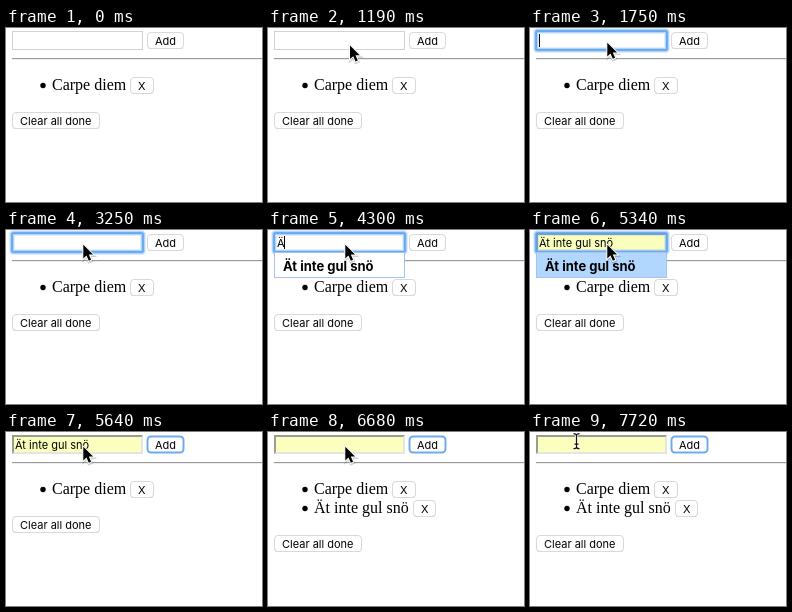
An HTML page for the animation above (8000 ms loop, 256 px wide and 174 px high).

```html
<!DOCTYPE html>
<html lang="sv">
<head>
<meta charset="utf-8">
<title>Todo list</title>
<style>
  html, body { margin: 0; width: 100%; height: 100%; overflow: hidden; background: #fff; }
  svg { display: block; width: 100%; height: 100%; }
  text { white-space: pre; fill: #000; }
  .ui { font: 11px Inter, "Open Sans", sans-serif; }
  .bold { font: 700 13px Inter, "Open Sans", sans-serif; }
  .serif { font: 16px "Liberation Serif", "Noto Serif", serif; }
  .ring rect { fill: none; stroke: #5aa2f2; }
</style>
</head>
<body>
<svg viewBox="0 0 256 174">
  <g id="page"></g>
</svg>
<script>
const NS = 'http://www.w3.org/2000/svg';
const LOOP = 8000;
const TASK = 'Ät inte gul snö';
const page = document.getElementById('page');

function add(parent, tag, attrs = {}, text) {
  const el = document.createElementNS(NS, tag);
  for (const key in attrs) el.setAttribute(key, attrs[key]);
  if (text) el.textContent = text;
  parent.appendChild(el);
  return el;
}

const group = (parent = page) => add(parent, 'g');
const box = (parent, x, y, width, height, fill) =>
  add(parent, 'rect', { x, y, width, height, fill });
const label = (parent, cls, x, y, text) =>
  add(parent, 'text', { class: cls, x, y }, text);

function button(parent, x, y, width, textX, text) {
  add(parent, 'rect', { x: x + .5, y: y + .8, width: width - 1, height: 16.2, rx: 3.5, fill: '#c4c4c4' });
  add(parent, 'rect', { x: x + .5, y: y + .5, width: width - 1, height: 16, rx: 3.5, fill: '#fff', stroke: '#d9d9d9' });
  label(parent, 'ui', textX, y + 13, text);
}

function item(parent, y, text, buttonX, width) {
  add(parent, 'circle', { cx: 37, cy: y - 4.5, r: 2.7 });
  label(parent, 'serif', 46, y, text);
  button(parent, buttonX, y - 13, width, buttonX + 8, 'X');
}

// Rule and list
box(page, 6, 30, 250, 1, '#9a9a9a');
box(page, 6, 31, 250, 1, '#eee');
item(page, 62, 'Carpe diem', 124, 24);
const newItem = group();
item(newItem, 81, TASK, 145, 23);
const clear = group();
button(clear, 6, 84, 88, 14, 'Clear all done');

// Input field
const plain = add(page, 'rect', { x: 6.5, y: 3.5, width: 130, height: 18, fill: '#fff', stroke: '#d2d2d2' });
const filled = group();
box(filled, 6, 3, 131, 19, '#e4e4e0');
add(filled, 'path', { d: 'M6 22V3H137L135 5H8V20Z', fill: '#9c9c94' });
box(filled, 8, 5, 127, 15, '#faffbd');

const focus = group();
focus.setAttribute('class', 'ring');
for (const [width, opacity] of [[6, .18], [4, .35], [2, .75]])
  add(focus, 'rect', { x: 6, y: 3, width: 131, height: 19, rx: 1.5, 'stroke-width': width, 'stroke-opacity': opacity });

const typed = label(page, 'ui', 9, 17, '');
const caret = box(page, 9, 6, 1, 13, '#000');

button(page, 141, 4, 37, 149, 'Add');
const addFocus = group();
addFocus.setAttribute('class', 'ring');
add(addFocus, 'rect', { x: 141.5, y: 4.5, width: 36, height: 16, rx: 3.5, 'stroke-width': 2, 'stroke-opacity': .85 });

// Suggestion list
const menu = group();
const menuBox = add(menu, 'rect', { x: 6.5, y: 22.5, width: 130, height: 25, stroke: '#a4c3ee' });
label(menu, 'bold', 15, 41, TASK);

// Pointers
const arrow = group();
const arrowPath = 'M0 0V13.6L3.2 10.7L5.5 16L7.8 15L5.5 9.8H9.8Z';
add(arrow, 'path', { d: arrowPath, transform: 'translate(.3 1)', fill: 'none', stroke: '#000', 'stroke-opacity': .18, 'stroke-width': 3 });
add(arrow, 'path', { d: arrowPath, stroke: '#fff', 'stroke-width': 2, 'paint-order': 'stroke' });
const beam = group();
const beamPath = 'M-3 -7.5Q0 -7.5 0 -5.5Q0 -7.5 3 -7.5M0 -5.5V5.5M-3 7.5Q0 7.5 0 5.5Q0 7.5 3 7.5M-2 3H2';
add(beam, 'path', { d: beamPath, fill: 'none', stroke: '#fff', 'stroke-width': 2.6 });
add(beam, 'path', { d: beamPath, fill: 'none', stroke: '#111', 'stroke-width': 1.2 });

// Each step: start time, value
const typing = [
  [0, ''], [4300, 'Ä'], [4450, 'Ät'], [4600, 'Ät '], [4750, 'Ät in'],
  [4900, 'Ät inte'], [5040, 'Ät inte '], [5340, TASK], [6680, '']
];
const blink = [
  [0, false], [1750, true], [2200, false], [2650, true], [3250, false],
  [3700, true], [4150, false], [4300, true], [5340, false]
];
const pointer = [
  [0, null], [1040, [arrow, 123, 29.5]], [1190, [arrow, 82, 17.5]], [1330, [arrow, 77.3, 14.8]],
  [7430, [beam, 5, 9.2]], [7570, [arrow, -1, 9]], [7720, [beam, 46.5, 9.2]]
];

const at = (steps, t) => steps.findLast(step => step[0] <= t)[1];
const show = (el, on) => el.setAttribute('visibility', on ? 'visible' : 'hidden');

function draw(t) {
  const within = (from, to = LOOP) => t >= from && t < to;
  const added = within(6680);
  const auto = within(5340);

  show(plain, !auto);
  show(filled, auto);
  show(focus, within(1750, 5640));
  show(addFocus, within(5640));
  show(menu, within(4300, 5640));
  menuBox.setAttribute('fill', auto ? '#b2d7fe' : '#fff');
  show(newItem, added);
  clear.setAttribute('transform', `translate(0 ${added ? 19 : 0})`);

  const text = at(typing, t);
  if (typed.textContent !== text) typed.textContent = text;
  show(caret, at(blink, t));
  caret.setAttribute('x', Math.floor(9 + (text ? typed.getComputedTextLength() : 0)));

  const cursor = at(pointer, t);
  for (const el of [arrow, beam]) show(el, cursor && cursor[0] === el);
  if (cursor) cursor[0].setAttribute('transform', `translate(${cursor[1]} ${cursor[2]})`);
}

function frame() {
  draw(performance.now() % LOOP);
  requestAnimationFrame(frame);
}
frame();
</script>
</body>
</html>
```
